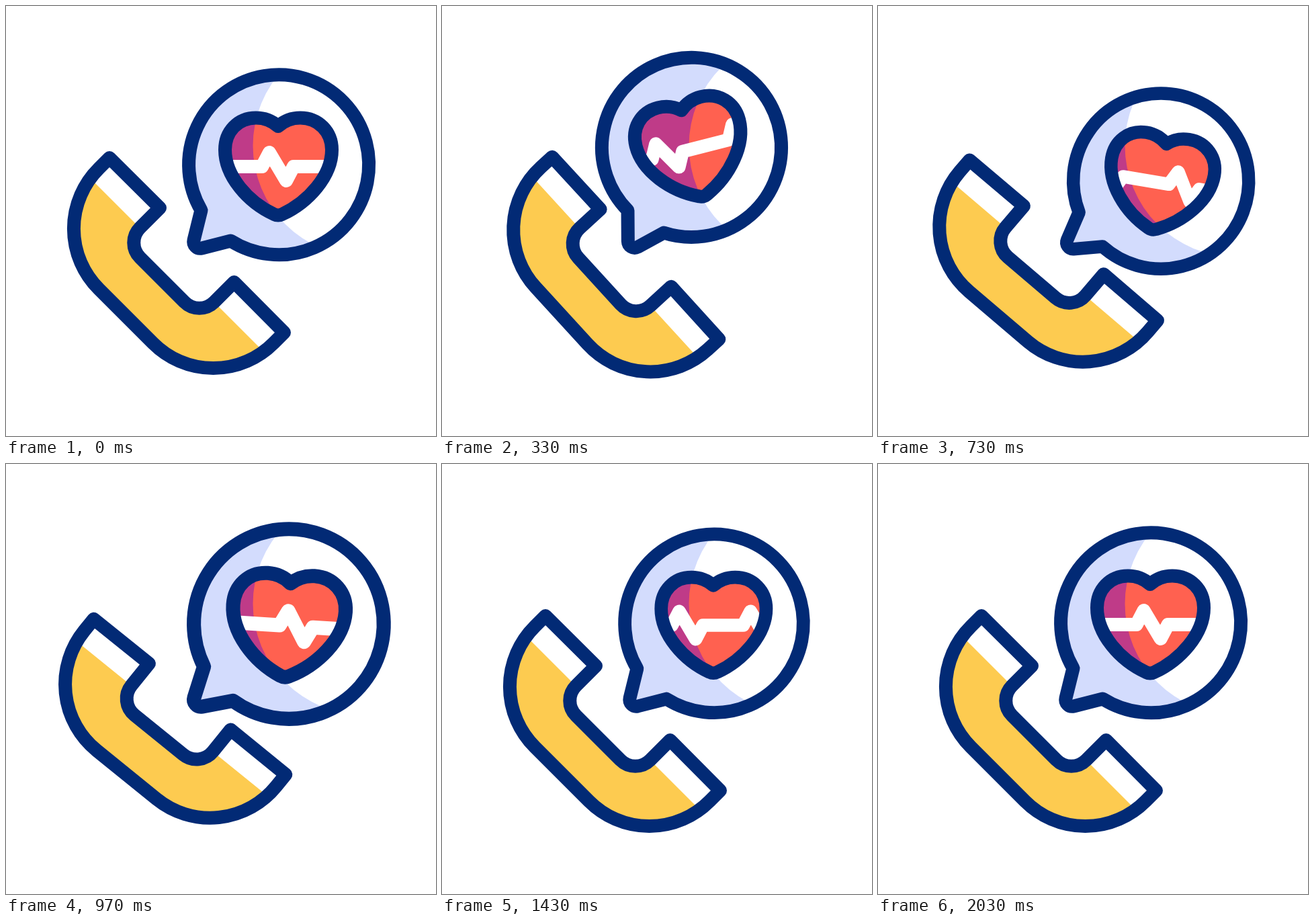
An HTML page with a canvas that plays this animation: 640x640 px, repeating every 2070 ms.

```html
<!DOCTYPE html>
<html lang="en">
<head>
<meta charset="utf-8">
<title>Health call</title>
<style>
  html, body { margin: 0; width: 100%; height: 100%; overflow: hidden; background: #fff; }
  canvas { display: block; width: 100vmin; height: 100vmin; }
</style>
</head>
<body>
<canvas id="stage" width="640" height="640"></canvas>
<script>
const ctx = document.getElementById('stage').getContext('2d');
const LOOP = 2070, FRAMES = 62;
const NAVY = '#022a75', WHITE = '#fff';

const phone = new Path2D(`M154 226 L229 300.5 L199.5 330 A31.4 31.4 0 0 0 199.5 374.5
  L265.5 440.5 A31.4 31.4 0 0 0 310 440.5 L339.5 411 L414 486 L398 502
  A126.5 126.5 0 0 1 219 502 L138 421 A126.5 126.5 0 0 1 138 242 Z`);
const grip = new Path2D('M0 131 L509 640 L0 640 Z');
const bubble = new Path2D(`M290.5 304 A134 134 0 1 1 334.5 349.5 L291.5 360.5
  A10 10 0 0 1 279.5 348.5 Z`);
const heart = new Path2D(`M405 179 C396 171 385 166.5 372 166.5 C345 166.5 326 187 326 214
  C326 253 360 292 399 310 Q405 313 411 310 C450 292 485 253 485 214
  C485 187 465 166.5 438 166.5 C425 166.5 414 171 405 179Z`);

// The lit side is one circle that stays put while the shapes move under it.
const light = new Path2D();
light.arc(533, 208, 165.5, 0, 7);

// Heartbeat line: one wave repeated along x, with long and short rests in turn.
const WAVE = 113;
const pulse = new Path2D();
pulse.moveTo(200, 239);
for (let i = -1; i < 5; i++) {
  const x = 392 + i * WAVE + (i % 2 ? 5 : 0);
  pulse.lineTo(x - 11, 239);
  pulse.lineTo(x, 218);
  pulse.lineTo(x + 25, 260);
  pulse.lineTo(x + 36, 239);
}

const clamp = (v, lo, hi) => Math.min(hi, Math.max(lo, v));
const smooth = u => (1 - Math.cos(Math.PI * clamp(u, 0, 1))) / 2;

// Sum of eased moves, each given as [from, to, change].
const moves = (f, base, ...list) =>
  list.reduce((v, [a, b, change]) => v + change * smooth((f - a) / (b - a)), base);

// The phone shakes four times, with smaller first and last swings.
function ring(f) {
  const n = clamp((f - 1) / 4, 0, 8), c = Math.cos(Math.PI * n);
  return n < 1 || n > 7 ? 3 * c - 3 : 5 * c - 1;
}
const sway = f => moves(f, 0, [1, 10, -14.3], [10, 24.5, 25.6], [24.5, 34, -16.6], [34, 43.5, 5.3]);
const swell = f => moves(f, 1, [8.5, 18.5, -.056], [18.5, 28.5, .111], [28.5, 38.5, -.07], [38.5, 48.5, .015]);
const beat = f => moves(f, 1, [41, 49, -.057], [49, 57, .057]);
const scroll = f => -2 * WAVE * f / FRAMES;

function turn(x, y, degrees, scale = 1) {
  ctx.translate(x, y);
  ctx.rotate(degrees * Math.PI / 180);
  ctx.scale(scale, scale);
  ctx.translate(-x, -y);
}

function fill(path, color) {
  ctx.fillStyle = color;
  ctx.fill(path);
}

function stroke(path, color) {
  ctx.strokeStyle = color;
  ctx.stroke(path);
}

// Fills a shape, paints extras inside it, then outlines it.
function shape(path, color, inside) {
  ctx.save();
  ctx.clip(path);
  fill(path, color);
  inside();
  ctx.restore();
  stroke(path, NAVY);
}

function shine(color) {
  ctx.save();
  ctx.resetTransform();
  fill(light, color);
  ctx.restore();
}

function draw(f) {
  ctx.resetTransform();
  ctx.fillStyle = WHITE;
  ctx.fillRect(0, 0, 640, 640);
  ctx.lineWidth = 20;
  ctx.lineJoin = 'round';

  ctx.save();
  turn(188, 452, ring(f));
  shape(phone, WHITE, () => fill(grip, '#fdcb50'));
  ctx.restore();

  ctx.save();
  turn(284, 360, sway(f), swell(f));
  shape(bubble, '#d3dcfd', () => shine(WHITE));
  turn(405, 236, 0, beat(f));
  shape(heart, '#bf3b88', () => {
    shine('#ff6150');
    ctx.translate(scroll(f), 0);
    stroke(pulse, WHITE);
  });
  ctx.restore();
}

const start = performance.now();
function tick() {
  const t = (performance.now() - start) % LOOP;
  draw(Math.min(FRAMES - 1, Math.floor(t * .03 + .15)));
  requestAnimationFrame(tick);
}
tick();
</script>
</body>
</html>
```
